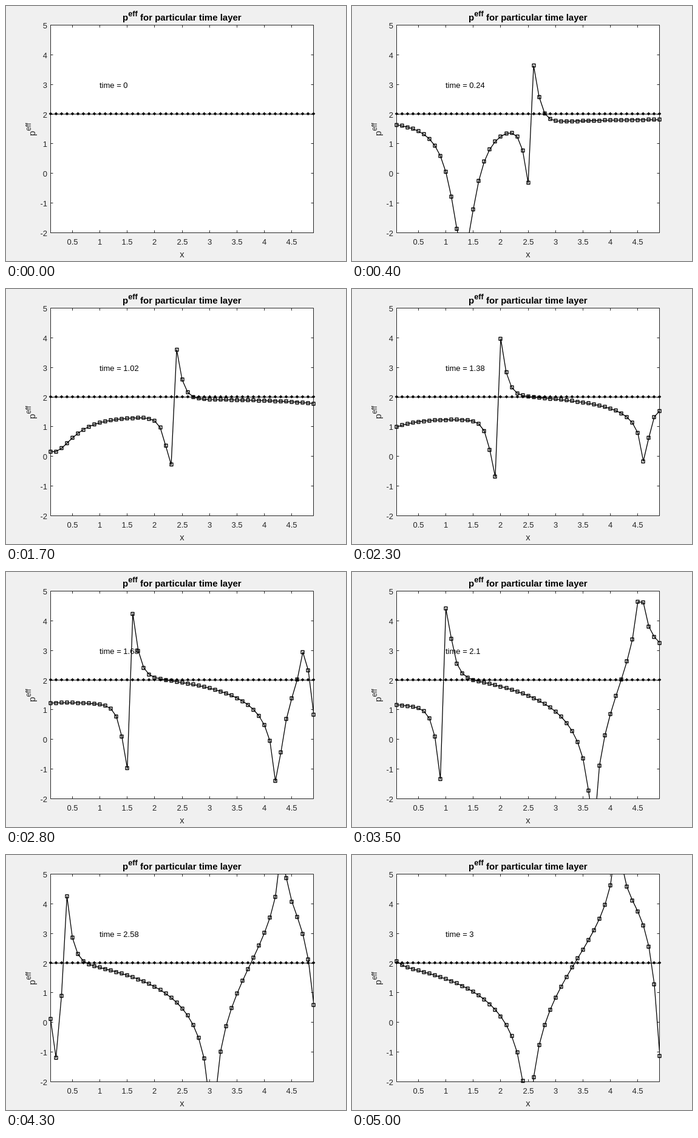
Animation of 560x420 px, one loop 5.1 s. Source, as an HTML page with a canvas:

```html
<!DOCTYPE html>
<html lang="en">
<head>
<meta charset="utf-8">
<title>Effective pressure</title>
<style>
  html, body { margin: 0; width: 100%; height: 100%; overflow: hidden; background: #f0f0f0; }
  canvas { display: block; width: 560px; height: 420px; }
</style>
</head>
<body>
<canvas id="plot" width="560" height="420"></canvas>
<script>
const ctx = document.getElementById('plot').getContext('2d');
const STEP_MS = 100, STEPS = 51, DT = 0.06;
const BOX = { left: 73.5, right: 506.5, top: 31.5, bottom: 373.5 };
const FONT = '"Liberation Sans", Arial, sans-serif';
const INK = '#262626';
const X_END = 4.9;
const grid = Array.from({ length: 49 }, (_, i) => (i + 1) / 10);

const px = x => 73.3 + (x - 0.1) * 90.35;
const py = y => BOX.top + (5 - y) * (BOX.bottom - BOX.top) / 7;
const crisp = v => Math.floor(v) + 0.5;
const clamp01 = v => Math.min(1, Math.max(0, v));
const smooth = (a, b, v) => {
  const u = clamp01((v - a) / (b - a));
  return u * u * (3 - 2 * u);
};
const softLog = d => Math.log(Math.hypot(d, 0.02));

// Strength of the dip at the right edge, as [time, value].
const edgeKeys = [[1.02, 0], [1.68, -2], [2.1, 0], [2.58, -2.85], [3, -4.7]];

function track(keys, t) {
  if (t <= keys[0][0]) return keys[0][1];
  const i = Math.max(1, keys.findIndex(key => key[0] >= t));
  const [t0, a] = keys[i - 1], [t1, b] = keys[i];
  return a + (b - a) * clamp01((t - t0) / (t1 - t0));
}

// The moving features of the pressure at one time.
function features(t) {
  return {
    base: 1.82 + 0.06 * t,
    dip: { x: 1.68 - 1.5 * t, depth: 6.6 * Math.exp(-1.6 * t), width: 0.2 + 0.25 * t },
    shock: {
      x: 2.56 - 1.38 * 0.18 * Math.log(1 + Math.exp((t - 0.945) / 0.18)),
      size: 3.2 + 0.4 * t * t + 3 * Math.exp(-t / 0.15),
      step: 1.4 * (1 - Math.exp(-Math.max(0, t - 0.54) / 0.9)),
    },
    wave: {
      strength: smooth(0.6, 2.2, t),
      trough: 2.5 + 1.31 * (3 - t),
      peak: 4.13 + 0.46 * (3 - t),
    },
    edge: track(edgeKeys, t),
  };
}

function pressure(x, { base, dip, shock, wave, edge }) {
  const d = x - shock.x;
  const side = Math.tanh(d / 0.04);
  const logs = 1.5 * softLog(x - wave.trough) - softLog(x - wave.peak);
  return base
    - dip.depth / (1 + ((x - dip.x) / dip.width) ** 2)
    + shock.size * side * Math.exp(-Math.abs(d) / 0.1)
    - shock.step * (1 - side) / 2
    + wave.strength * logs
    + edge * Math.exp((x - X_END) / 0.145);
}

function text(str, x, y, size = 13, align = 'left', color = INK, weight = '') {
  ctx.font = `${weight} ${size}px ${FONT}`;
  ctx.textAlign = align;
  ctx.fillStyle = color;
  ctx.fillText(str, x, y);
  return x + ctx.measureText(str).width;
}

function segment(x1, y1, x2, y2) {
  ctx.beginPath();
  ctx.moveTo(x1, y1);
  ctx.lineTo(x2, y2);
  ctx.stroke();
}

function drawAxes() {
  const { left, right, top, bottom } = BOX;
  ctx.fillStyle = '#f0f0f0';
  ctx.fillRect(0, 0, 560, 420);
  ctx.fillStyle = '#fff';
  ctx.fillRect(left, top, right - left, bottom - top);
  ctx.strokeStyle = INK;
  ctx.lineWidth = 1;
  ctx.strokeRect(left, top, right - left, bottom - top);
  for (let v = 0.5; v <= 4.5; v += 0.5) {
    const x = crisp(px(v));
    segment(x, bottom, x, bottom - 4);
    segment(x, top, x, top + 4);
    text(String(v), x, 393, 13, 'center');
  }
  for (let v = -2; v <= 5; v++) {
    const y = crisp(py(v));
    segment(left, y, left + 4, y);
    segment(right, y, right - 4, y);
    text(String(v), 68, y + 5, 13, 'right');
  }
  text('x', 290, 414, 14.67, 'center');

  let x = text('p', 192, 24, 15, 'left', '#000', 'bold');
  x = text('eff', x, 17, 12.8, 'left', '#000', 'bold');
  text(' for particular time layer', x, 24, 15, 'left', '#000', 'bold');

  ctx.save();
  ctx.translate(48, 214);
  ctx.rotate(-Math.PI / 2);
  text('eff', text('p', 0, 0, 14.67), -7, 12);
  ctx.restore();
}

function drawDiamond(x, y) {
  ctx.beginPath();
  ctx.moveTo(x - 2.8, y);
  ctx.lineTo(x, y - 2.8);
  ctx.lineTo(x + 2.8, y);
  ctx.lineTo(x, y + 2.8);
  ctx.fill();
}

function drawReference() {
  ctx.strokeStyle = ctx.fillStyle = '#000';
  segment(px(grid[0]), py(2), px(X_END), py(2));
  grid.forEach(x => drawDiamond(crisp(px(x)), crisp(py(2)) - 1));
}

function drawCurve(values) {
  ctx.lineWidth = 1.3;
  ctx.lineJoin = 'round';
  ctx.save();
  ctx.beginPath();
  ctx.rect(BOX.left, BOX.top, BOX.right - BOX.left, BOX.bottom - BOX.top);
  ctx.clip();
  ctx.beginPath();
  values.forEach((y, i) => ctx.lineTo(px(grid[i]), py(y)));
  ctx.stroke();
  ctx.restore();
  values.forEach((y, i) => {
    if (y < -2 || y > 5) return;
    ctx.strokeRect(Math.floor(px(grid[i])) - 2, Math.round(py(y)) - 2.5, 5, 5);
  });
}

function draw(step) {
  const time = step * DT;
  drawAxes();
  drawReference();
  if (step > 0) {
    const state = features(time);
    drawCurve(grid.map(x => pressure(x, state)));
  }
  text('time = ' + Number(time.toFixed(2)), 154, 135, 13, 'left', '#000');
}

function tick() {
  draw(Math.floor(performance.now() / STEP_MS) % STEPS);
  requestAnimationFrame(tick);
}
tick();
</script>
</body>
</html>
```
